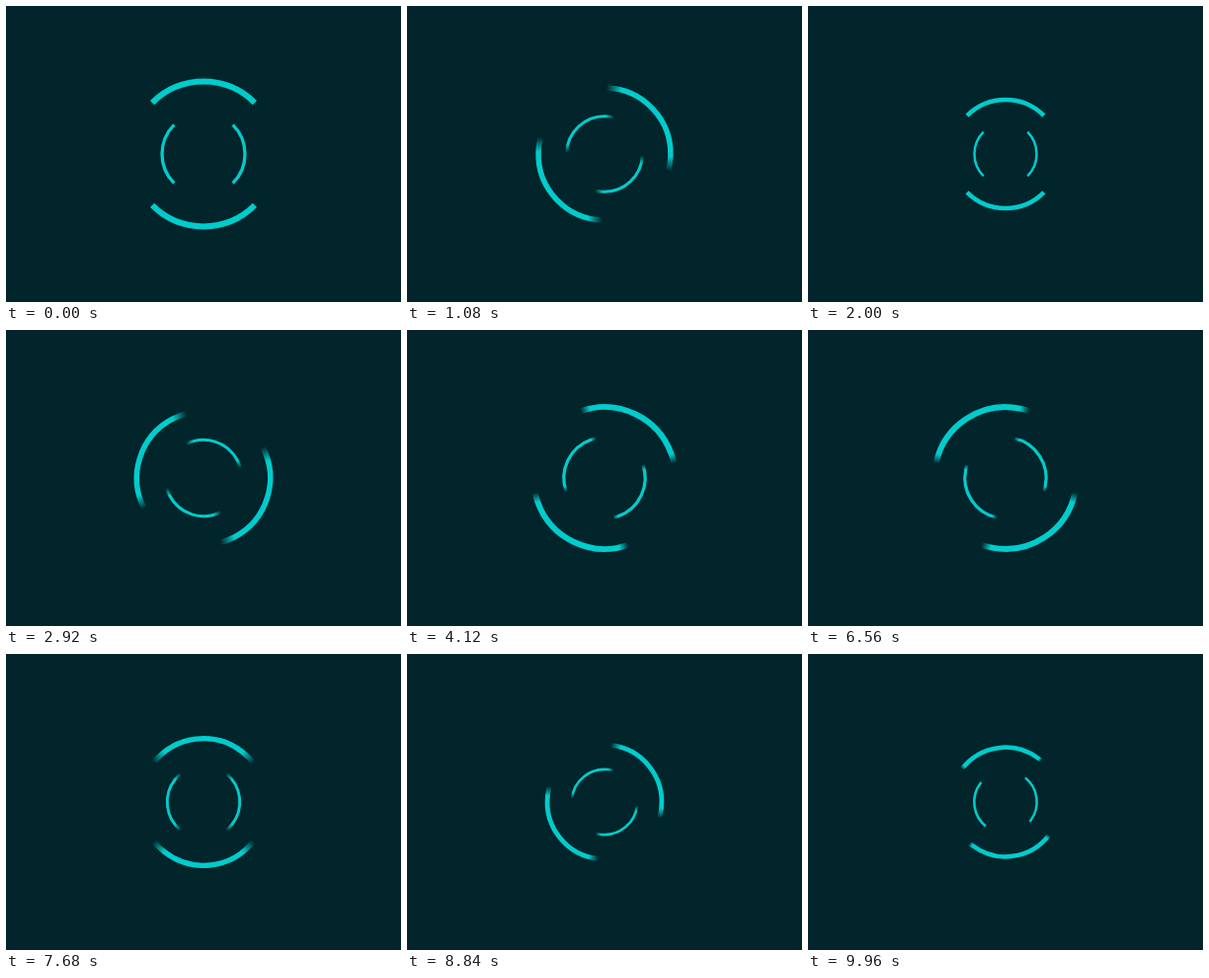
Write an HTML page with a canvas that moves like this. It is 400x300 px and loops after 10000 ms.

```html
<!DOCTYPE html>
<html lang="en">
<head>
<meta charset="utf-8">
<title>Spinner</title>
<style>
  html, body { margin: 0; width: 100%; height: 100%; overflow: hidden; background: #02252b; }
  canvas { display: block; width: 400px; height: 300px; }
</style>
</head>
<body>
<canvas id="stage" width="400" height="300"></canvas>
<script>
const LOOP = 10000;     // ms
const STEP = 40;        // ms each picture stays
const TICKS = 0.06;     // animation ticks per ms
const HALF = 40;        // ticks per turn; the rings shrink on one turn and grow on the next
const TAU = Math.PI * 2;
const RGB = '0, 204, 204';

const rings = [
  { radius: 73.4, width: 6, angle: -Math.PI / 2 },
  { radius: 42, width: 3.3, angle: Math.PI }
];

const ctx = document.getElementById('stage').getContext('2d');

const smooth = x => x * x * (3 - 2 * x);

// Eased number of turns since the start
function turns(tick) {
  const n = Math.floor(tick / HALF);
  return n + smooth(tick / HALF - n);
}

function scaleAt(tick) {
  const n = Math.floor(tick / HALF);
  const e = turns(tick) - n;
  return 1 - 0.25 * (n % 2 ? 1 - e : e);
}

// Quarter arc whose ends fade linearly over the angle swept by the shutter
function drawArc(mid, radius, width, blur) {
  const half = Math.PI / 4;
  let from = mid - half;
  let to = mid + half;
  ctx.lineWidth = width;
  if (blur < 0.01) {
    ctx.strokeStyle = `rgb(${RGB})`;
  } else {
    from -= blur / 2;
    to += blur / 2;
    const span = (to - from) / TAU;
    const fade = blur / TAU;
    const g = ctx.createConicGradient(from, 200, 150);
    g.addColorStop(0, `rgba(${RGB}, 0)`);
    g.addColorStop(fade, `rgba(${RGB}, 1)`);
    g.addColorStop(span - fade, `rgba(${RGB}, 1)`);
    g.addColorStop(span, `rgba(${RGB}, 0)`);
    g.addColorStop(1, `rgba(${RGB}, 0)`);
    ctx.strokeStyle = g;
  }
  ctx.beginPath();
  ctx.arc(200, 150, radius, from, to);
  ctx.stroke();
}

function draw(ms) {
  const tick = Math.floor(Math.floor(ms / STEP) * STEP * TICKS + 1e-6);
  const turn = turns(tick) * TAU;
  const blur = (turns(tick + 0.5) - turns(tick - 0.5)) * TAU;
  const scale = scaleAt(tick);

  ctx.fillStyle = '#02252b';
  ctx.fillRect(0, 0, 400, 300);
  for (const { radius, width, angle } of rings) {
    for (const side of [0, Math.PI]) {
      drawArc((angle + side + turn) % TAU, radius * scale, width * scale, blur);
    }
  }
}

const start = performance.now();
function frame() {
  draw((performance.now() - start) % LOOP);
  requestAnimationFrame(frame);
}
frame();
</script>
</body>
</html>
```
